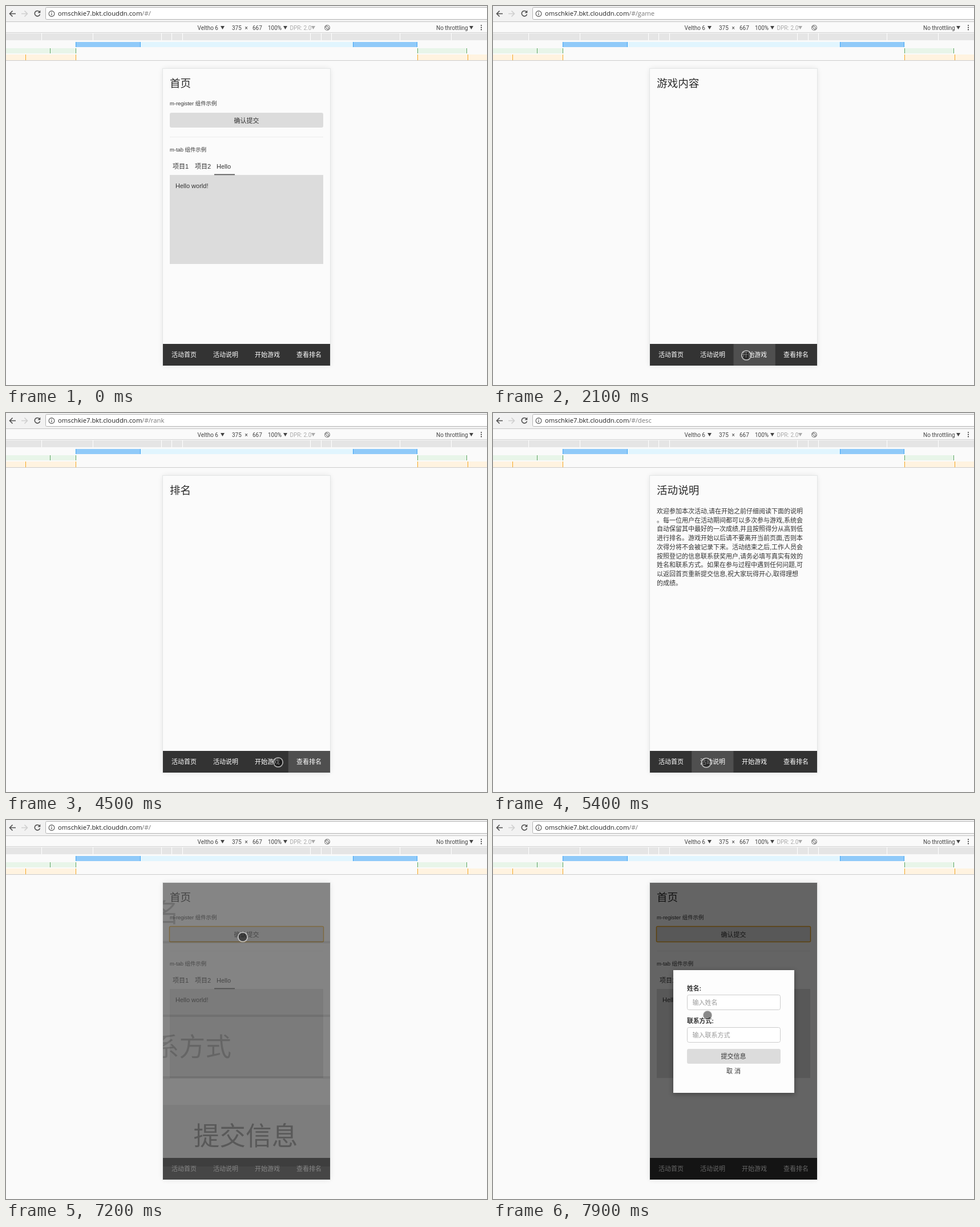
Animation, 843 px wide and 664 px high, one loop 8 s. Source, as an HTML page:

```html
<!DOCTYPE html>
<html lang="zh-CN">
<head>
<meta charset="utf-8">
<title>Mobile demo</title>
<style>
  html, body { margin: 0; width: 100%; height: 100%; overflow: hidden; background: #fafafa; }
  svg { display: block; width: 843px; height: 664px; }
  text { font: 11px "Liberation Sans", "Noto Sans CJK SC", "Noto Sans CJK", sans-serif; fill: #333; white-space: pre; }
  .url { font: 11.25px "Open Sans", sans-serif; fill: #222; }
  .bar text { font: 10px Roboto, sans-serif; fill: #444; }
  .bar .dim { fill: #aaa; }
  text.title { font-size: 18.6px; fill: #2b2b2b; }
  text.small { font-size: 9.4px; }
  text.label { font-weight: 700; font-size: 10.8px; }
  text.hint { fill: #999; }
  #nav text { fill: #fff; }
  .mid { text-anchor: middle; }
</style>
</head>
<body>
<svg viewBox="0 0 843 664" xmlns="http://www.w3.org/2000/svg">
  <defs>
    <clipPath id="screen"><rect x="275" y="110" width="293" height="520"/></clipPath>
    <filter id="soft" x="-20%" y="-20%" width="140%" height="140%"><feGaussianBlur stdDeviation="5"/></filter>
  </defs>
  <rect width="843" height="664" fill="#fafafa"/>

  <!-- address bar -->
  <rect width="843" height="27" fill="#f2f2f2"/>
  <rect x="69.5" y="2.5" width="790" height="21" rx="2" fill="#fff" stroke="#b4b4b4"/>
  <g fill="none" stroke="#505050" stroke-width="1.6">
    <path d="M17 13.5H6.500M11.500 8.500L6.500 13.500L11.500 18.500"/>
    <path d="M27 13.500H37.500M32.500 8.500L37.500 13.500L32.500 18.500" stroke="#cfcfcf"/>
    <path d="M58.500 10A4.700 4.700 0 1 0 59.500 14.500"/>
    <circle cx="80" cy="13.500" r="4.900" stroke-width="1.100"/>
    <path d="M80 12.800V16.300M80 10.500V11.700" stroke-width="1.200"/>
  </g>
  <path d="M60.300 7.500V12.300H55.500Z" fill="#505050"/>
  <text class="url" x="91" y="17">omschkie7.bkt.clouddn.com<tspan id="route" fill="#777"></tspan></text>
  <rect y="27" width="843" height="1" fill="#c4c4c4"/>

  <!-- device toolbar -->
  <g class="bar">
    <text x="335.500" y="41.500">Veltho 6</text>
    <text x="396" y="41.500">375</text>
    <text x="418.500" y="41.500">×</text>
    <text x="432" y="41.500">667</text>
    <text x="459" y="41.500">100%</text>
    <text x="497.500" y="41.500" class="dim">DPR: 2.0</text>
    <text x="754" y="41.500">No throttling</text>
    <g fill="#444">
      <path d="M376 35h7l-3.500 6zM486 35h7l-3.500 6zM812 35h7l-3.500 6z"/>
      <path d="M535 35h7l-3.500 6z" fill="#aaa"/>
      <circle cx="833" cy="34" r="1.100"/><circle cx="833" cy="37.700" r="1.100"/><circle cx="833" cy="41.400" r="1.100"/>
    </g>
    <g fill="none" stroke="#777" transform="rotate(-45 563 38)">
      <circle cx="563" cy="38" r="4.500"/><rect x="561.300" y="35" width="3.400" height="6"/>
    </g>
  </g>
  <rect y="46" width="843" height="1" fill="#d0d0d0"/>
  <g id="media"></g>
  <rect y="95" width="843" height="1" fill="#ccc"/>

  <!-- phone -->
  <rect x="275" y="110" width="293" height="520" fill="#000" opacity=".1" filter="url(#soft)"/>
  <rect x="274.500" y="109.500" width="294" height="521" fill="#fbfbfb" stroke="#e4e6e6"/>
  <g clip-path="url(#screen)">
    <text id="title" class="title" x="287" y="142"></text>
    <g id="home">
      <text class="small" x="287" y="173.500">m-register 组件示例</text>
      <rect x="287" y="187" width="269" height="26" rx="3" fill="#dcdcdc"/>
      <rect id="focus" x="286.500" y="186.500" width="270" height="27" rx="2" fill="none" stroke="#e5a11c" stroke-width="1.500"/>
      <text class="mid" x="421.500" y="204.500">确认提交</text>
      <rect x="287" y="229" width="269" height="1" fill="#ececec"/>
      <text class="small" x="287" y="254.500">m-tab 组件示例</text>
      <text x="292" y="285">项目1</text>
      <text x="331" y="285">项目2</text>
      <text x="369" y="285">Hello</text>
      <rect x="287" y="296" width="269" height="156" fill="#dcdcdc"/>
      <rect x="365" y="294.500" width="36" height="1.700" fill="#555"/>
      <text x="297" y="319">Hello world!</text>
    </g>
    <g id="desc"></g>
    <rect x="275" y="592" width="293" height="38" fill="#333"/>
    <rect id="lit" y="592" width="73.250" height="38" fill="#4f4f4f"/>
    <g id="nav"></g>
    <rect id="shade" x="275" y="110" width="293" height="520" fill="#000" opacity=".6"/>
    <g id="modal">
      <rect x="316" y="265" width="212" height="215" fill="#000" opacity=".35" filter="url(#soft)"/>
      <rect x="316" y="263" width="212" height="215" fill="#fdfdfd"/>
      <text class="label" x="340" y="299">姓名:</text>
      <rect x="340.500" y="306.500" width="163" height="26" rx="3" fill="#fff" stroke="#ccc"/>
      <text class="hint" x="349.500" y="324">输入姓名</text>
      <text class="label" x="340" y="355.500">联系方式:</text>
      <rect x="340.500" y="363.500" width="163" height="26" rx="3" fill="#fff" stroke="#ccc"/>
      <text class="hint" x="349.500" y="380.500">输入联系方式</text>
      <rect x="340" y="401" width="164" height="26" rx="3" fill="#dcdcdc"/>
      <text class="mid" x="421.500" y="418">提交信息</text>
      <text class="mid" x="421.500" y="444">取 消</text>
    </g>
  </g>
  <circle id="touch" r="8.200" fill="#000" fill-opacity=".46" stroke="#fff" stroke-opacity=".62" stroke-width="1.800"/>
  <path id="beam" d="M-3 -8H3M0 -8V8M-3 8H3" fill="none" stroke="#333"/>
</svg>
<script>
const LOOP = 8000, STEP = 100;
const NS = "http://www.w3.org/2000/svg";
const $ = id => document.getElementById(id);

function add(parent, tag, attrs, text = "") {
  const el = document.createElementNS(NS, tag);
  for (const k in attrs) el.setAttribute(k, attrs[k]);
  el.textContent = text;
  $(parent).append(el);
}
const bar = (x, y, width, height, fill) => add("media", "rect", { x, y, width, height, fill });
const ticks = (xs, y, h, fill) => xs.forEach(x => bar(x, y, 1, h, fill));

// media query rulers
bar(0, 48, 843, 12, "#e5e5e5");
ticks([62, 152, 272, 290, 309, 533, 552, 570, 690, 780], 48, 12, "#fff");
bar(122, 63, 599, 9, "#e1f5fe");
bar(122, 63, 114, 9, "#90caf9");
bar(608, 63, 113, 9, "#90caf9");
ticks([122, 235, 608, 720], 63, 9, "#42a5f5");
bar(0, 74, 122, 9, "#e8f5e9");
bar(721, 74, 87, 9, "#e8f5e9");
ticks([77, 122, 721, 807], 74, 9, "#5fa563");
bar(0, 85, 122, 10, "#fff3e0");
bar(721, 85, 122, 10, "#fff3e0");
ticks([34, 122, 721, 809], 85, 10, "#f5a623");

["活动首页", "活动说明", "开始游戏", "查看排名"].forEach((s, i) =>
  add("nav", "text", { x: 290 + 73 * i, y: 615 }, s));

const story = "欢迎参加本次活动,请在开始之前仔细阅读下面的说明。每一位用户在活动期间都可以多次参与游戏," +
  "系统会自动保留其中最好的一次成绩,并且按照得分从高到低进行排名。游戏开始以后请不要离开当前页面," +
  "否则本次得分将不会被记录下来。活动结束之后,工作人员会按照登记的信息联系获奖用户,请务必填写真实有效的姓名和联系方式。" +
  "如果在参与过程中遇到任何问题,可以返回首页重新提交信息,祝大家玩得开心,取得理想的成绩。";
story.replace(/,/g, ",").match(/.{1,24}/g).forEach((s, i) =>
  add("desc", "text", { x: 287, y: 176 + 15.7 * i }, s));

const pages = {
  home: ["首页", "/#/"],
  desc: ["活动说明", "/#/desc"],
  game: ["游戏内容", "/#/game"],
  rank: ["排名", "/#/rank"]
};

// time, page, highlighted item
const visits = [
  [0, "home", -1], [900, "home", 0], [1600, "desc", 1], [2100, "game", 2],
  [4100, "rank", 3], [4600, "game", 2], [5200, "desc", 1], [6200, "home", -1]
];

// time, x, y
const path = [
  [100, 747, 522], [200, 665, 523], [400, 470, 540], [500, 408, 556], [600, 327, 583], [700, 315, 613],
  [900, 315, 613], [1400, 380, 612], [2000, 380, 612], [2100, 444, 612],
  [2300, 460, 585], [2400, 465, 520], [2500, 444, 468], [2600, 366, 321], [2700, 350, 115], [2800, 318, 22],
  [2900, 313, 17], [3200, 313, 17], [3400, 345, 130], [3600, 430, 380], [3900, 527, 610],
  [4100, 527, 610], [4500, 477, 612], [4900, 403, 614], [5000, 397, 614], [5200, 390, 613],
  [6000, 325, 612], [6100, 325, 612], [6200, 310, 321], [6400, 310, 321], [6500, 312, 338],
  [7000, 415, 205], [7600, 415, 205], [7700, 362, 381], [7800, 353, 395], [7900, 376, 342]
];

// time, progress of the dialog zoom
const zoom = [[7200, 0.21], [7300, 0.55], [7400, 0.85], [7500, 1]];

function at(table, t) {
  const i = table.findIndex(row => row[0] > t);
  if (i < 0) return table[table.length - 1].slice(1);
  if (i === 0) return table[0].slice(1);
  const a = table[i - 1], b = table[i], p = (t - a[0]) / (b[0] - a[0]);
  return a.slice(1).map((v, k) => v + (b[k + 1] - v) * p);
}
const show = (id, on) => $(id).setAttribute("visibility", on ? "visible" : "hidden");

function draw(t) {
  const [, page, item] = visits.filter(v => v[0] <= t).pop();
  $("title").textContent = pages[page][0];
  $("route").textContent = pages[page][1];
  show("home", page === "home");
  show("desc", page === "desc");
  show("lit", item >= 0);
  $("lit").setAttribute("x", 275 + 73.25 * Math.max(item, 0));

  const open = t >= zoom[0][0];
  ["focus", "shade", "modal"].forEach(id => show(id, open));
  const [p] = at(zoom, t), s = 5 - 4 * p;
  $("modal").setAttribute("opacity", p);
  $("modal").setAttribute("transform", `translate(422 370) scale(${s}) translate(-422 -370)`);

  const [x, y] = at(path, t);
  show("touch", t >= 100 && y > 96);
  show("beam", t >= 100 && y <= 96);
  ["touch", "beam"].forEach(id => $(id).setAttribute("transform", `translate(${x} ${y})`));
}

function tick() {
  draw(Math.floor(performance.now() % LOOP / STEP) * STEP);
  requestAnimationFrame(tick);
}
tick();
</script>
</body>
</html>
```
